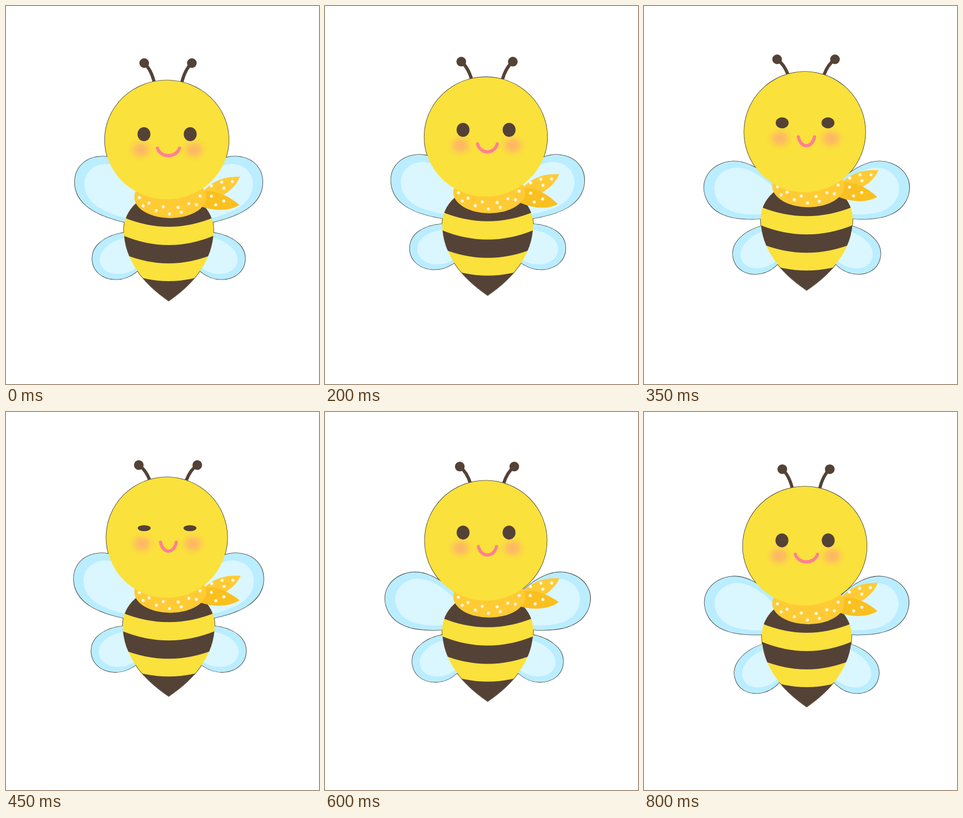
These frames come from a looping animation (582x702 px, 0.85 s). An HTML page with a canvas:

```html
<!DOCTYPE html>
<html lang="en">
<head>
<meta charset="utf-8">
<title>Bee</title>
<style>
  html, body { margin: 0; width: 100%; height: 100%; overflow: hidden; background: #fff; }
  canvas { display: block; }
</style>
</head>
<body>
<canvas id="stage" width="582" height="702"></canvas>
<script>
const ctx = document.getElementById('stage').getContext('2d');
const STEP = 50, STEPS = 17, TAU = Math.PI * 2;
const MID = 302.5;
const COLOR = {
  yellow: '#fae13b', dark: '#544237', wing: '#b9edff', wingInner: '#daf6ff',
  scarf: '#ffcb35', tail: '#fac01f', dot: '#fff6d6', mouth: '#ff7f94', line: '#333'
};

// Head rise per step; it follows the body slightly late.
const RISE = [0, .03, .095, .21, .38, .6, .82, 1, 1.06, 1.06, 1, .88, .67, .42, .2, .06, -.02];

const path = d => new Path2D(d);
const SHAPE = {
  upper: path('M262 408 C225 405 180 393 155 375 C137 362 128 345 128 327 C128 298 150 279 180 279 C212 279 245 306 270 370 Z'),
  upperInner: path('M262 400 C225 397 190 386 168 371 C153 360 146 346 146 331 C146 308 164 293 186 293 C214 293 240 320 262 370 Z'),
  lower: path('M270 425 C235 413 195 421 175 438 C164 447 160 458 160 468 C160 492 180 507 204 507 C230 507 252 490 275 455 Z'),
  lowerInner: path('M270 432 C240 424 205 430 188 445 C178 453 174 462 174 470 C174 487 190 497 208 497 C232 497 250 483 270 455 Z'),
  body: path('M302.5 547.5 C258 517 219 473 219 415 C219 380 250 345 302.5 345 C355 345 386 380 386 415 C386 473 347 517 302.5 547.5 Z'),
  tailTop: path('M362 350 C378 330 398 316 435 317 C428 334 415 345 402 352 L365 362 Z'),
  tailLow: path('M362 345 C385 340 412 350 434 369 C415 381 388 381 362 372 Z')
};
const DOTS = {
  scarf: [[248, 356], [255, 371], [266, 366], [279.5, 380], [292.5, 373], [304, 386],
          [320, 374], [326, 383], [340, 367], [354, 369], [361, 353]],
  tailTop: [[382, 334], [401, 327], [421, 326], [405, 338]],
  tailLow: [[382, 353], [390, 369], [405, 362]]
};

function placed(draw, dx, dy, angle = 0, px = 0, py = 0) {
  ctx.save();
  ctx.translate(px + dx, py + dy);
  ctx.rotate(angle);
  ctx.translate(-px, -py);
  draw();
  ctx.restore();
}

function mirrored(axis, draw) {
  draw();
  ctx.save();
  ctx.translate(2 * axis, 0);
  ctx.scale(-1, 1);
  draw();
  ctx.restore();
}

function fill(shape, color) {
  ctx.fillStyle = color;
  ctx.fill(shape);
}

function outline(shape) {
  ctx.strokeStyle = COLOR.line;
  ctx.lineWidth = 1.6;
  ctx.stroke(shape);
}

function oval(x, y, rx, ry) {
  const p = new Path2D();
  p.ellipse(x, y, rx, ry, 0, 0, TAU);
  return p;
}

function dots(list) {
  for (const [x, y] of list) fill(oval(x, y, 2.9, 2.9), COLOR.dot);
}

function wings(pose, paint, upper, lower) {
  mirrored(MID, () => {
    placed(() => paint(lower), 0, -pose.lift, pose.lowerAngle, 271.5, 442);
    placed(() => paint(upper), 0, -pose.lift, pose.upperAngle, 262, 392);
  });
}

function withBody(pose, draw) {
  ctx.save();
  ctx.translate(MID, -pose.lift);
  ctx.scale(1 + pose.lift * .00125, 1);
  ctx.translate(-MID, 0);
  draw();
  ctx.restore();
}

// Dark band between two sagging edges; heights are taken on the middle line.
function band(top, bottom) {
  const sag = 20, x0 = MID - 90, x1 = MID + 90;
  fill(path(`M${x0} ${top - sag} Q${MID} ${top + sag} ${x1} ${top - sag}` +
            `L${x1} ${bottom - sag} Q${MID} ${bottom + sag} ${x0} ${bottom - sag} Z`), COLOR.dark);
}

function drawBody() {
  fill(SHAPE.body, COLOR.yellow);
  ctx.save();
  ctx.clip(SHAPE.body);
  band(340, 410);
  band(444, 478);
  band(511, 580);
  ctx.restore();
}

function drawScarf(pose) {
  const { h } = pose;
  placed(() => {
    fill(SHAPE.tailTop, COLOR.scarf);
    dots(DOTS.tailTop);
  }, 0, -15 * h, .048 * h, 372, 345);
  placed(() => {
    fill(SHAPE.tailLow, COLOR.tail);
    dots(DOTS.tailLow);
  }, 0, -17 * h, pose.tailAngle, 372, 358);
  placed(() => {
    fill(oval(305.5, 355, 67, 39), COLOR.scarf);
    dots(DOTS.scarf);
  }, 0, -(pose.lift + 21 * h) / 2);
}

function drawAntenna(h) {
  const x = 257 - 9.5 * h, y = 106 - 7 * h;
  ctx.strokeStyle = COLOR.dark;
  ctx.lineWidth = 6;
  ctx.stroke(path(`M${x} ${y} Q${270 - 9.5 * h} ${118 - 10 * h} ${276 - 8 * h} ${143 - 15 * h}`));
  fill(oval(x, y, 9, 9), COLOR.dark);
}

function drawCheek(x, y) {
  ctx.save();
  ctx.translate(x, y);
  ctx.scale(1, .86);
  const glow = ctx.createRadialGradient(0, 0, 0, 0, 0, 27);
  glow.addColorStop(0, 'rgba(254,176,108,.95)');
  glow.addColorStop(.4, 'rgba(254,184,100,.75)');
  glow.addColorStop(1, 'rgba(252,215,70,0)');
  fill(oval(0, 0, 27, 27), glow);
  ctx.restore();
}

function drawFace(pose) {
  const { h } = pose, up = 21 * h;
  mirrored(300.5, () => drawCheek(251 + 2 * h, 267 - up));
  mirrored(299.5, () => fill(oval(256.5 + .4 * h, 238 - up, 12, pose.eye), COLOR.dark));

  const w = 20.5 - 5.5 * h, y = 264 - up, sag = y + (14 + 2.5 * h) * 4 / 3;
  ctx.strokeStyle = COLOR.mouth;
  ctx.lineWidth = 6;
  ctx.stroke(path(`M${302 - w} ${y} C${302 - w * .7} ${sag} ${302 + w * .7} ${sag} ${302 + w} ${y}`));
}

function poseAt(i) {
  const beat = i * 3 / 14;
  const upper = 1.07 * (1 - Math.cos(TAU * (beat - .03))) / 2;
  const lower = .3 + .7 * Math.cos(TAU * (beat - .31));
  const blink = Math.abs(i - 8.5);
  return {
    h: RISE[i],
    lift: 20.5 * (1 - Math.cos(TAU * i / 16)) / 2,
    upperAngle: -.305 * upper,
    lowerAngle: -.288 * lower,
    tailAngle: (.5 + 5 * Math.sin(TAU * i / 16)) / 62,
    eye: blink < 1 ? 5.5 : blink < 2 ? 10.3 : 13
  };
}

function draw(i) {
  const pose = poseAt(i), { h } = pose;
  const head = oval(299, 248.5 - 14.5 * h, 115.3 - 2.5 * h, 110.5 + 1.5 * h);
  ctx.fillStyle = '#fff';
  ctx.fillRect(0, 0, 582, 702);
  ctx.lineCap = 'round';

  // Lines go first so that only the outer silhouette keeps them.
  wings(pose, outline, SHAPE.upper, SHAPE.lower);
  withBody(pose, () => outline(SHAPE.body));
  outline(head);

  wings(pose, s => fill(s, COLOR.wing), SHAPE.upper, SHAPE.lower);
  wings(pose, s => fill(s, COLOR.wingInner), SHAPE.upperInner, SHAPE.lowerInner);
  withBody(pose, drawBody);
  drawScarf(pose);
  mirrored(301.3, () => drawAntenna(h));
  fill(head, COLOR.yellow);
  drawFace(pose);
}

function tick() {
  draw(Math.floor(performance.now() / STEP) % STEPS);
  requestAnimationFrame(tick);
}
tick();
</script>
</body>
</html>
```
